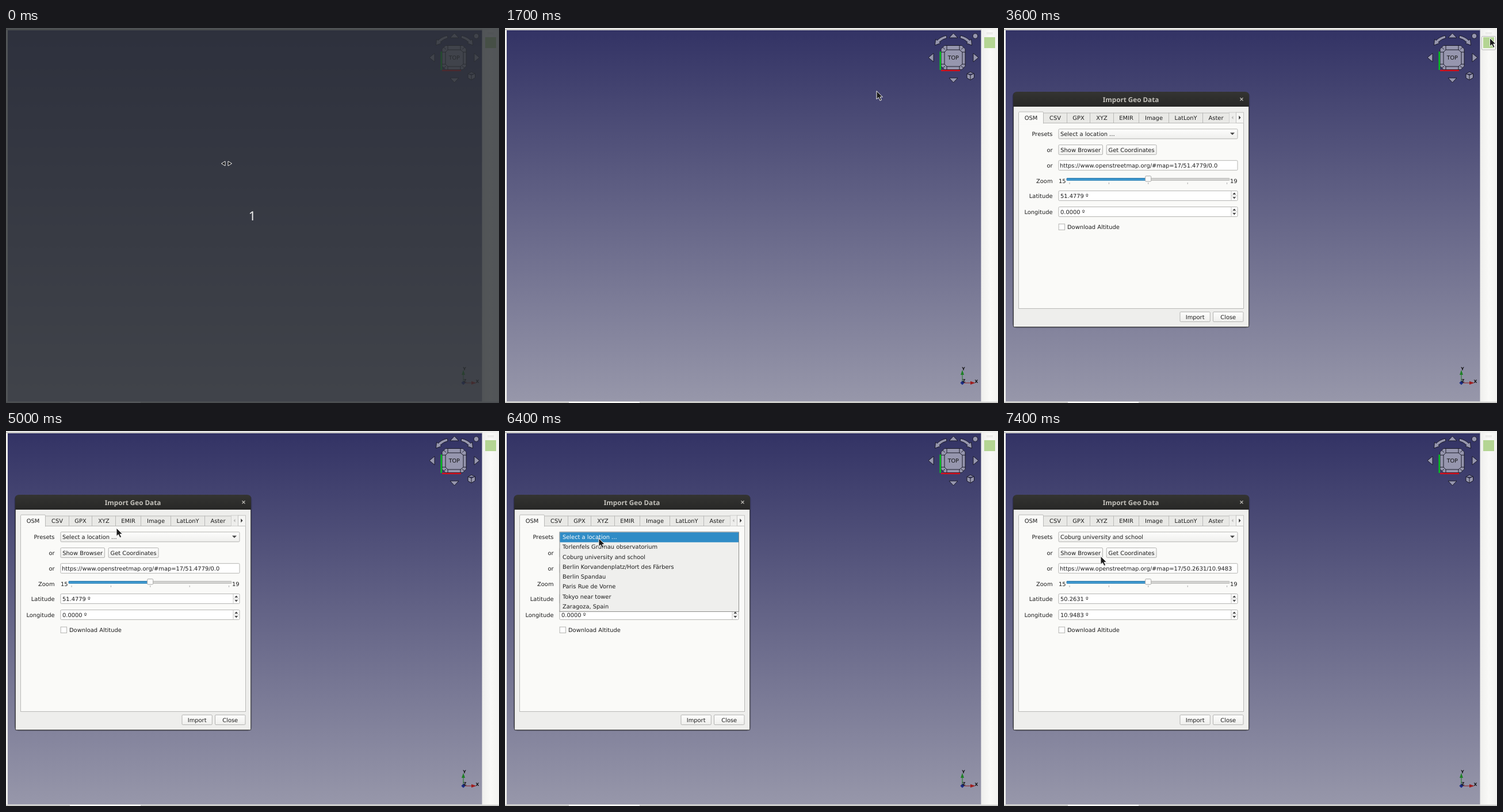
An HTML page for the animation above (8 s loop, 857 by 653 pixels).

```html
<!DOCTYPE html>
<html lang="en">
<head>
<meta charset="utf-8">
<title>Import Geo Data</title>
<style>
html, body { margin: 0; width: 100%; height: 100%; overflow: hidden; background: #efefed; }
svg { display: block; font: 9.9px "DejaVu Sans", sans-serif; text-rendering: geometricPrecision; }
text { white-space: pre; }
</style>
</head>
<body>
<svg id="stage" width="857" height="653" viewBox="0 0 857 653"></svg>
<script>
const stage = document.getElementById("stage");
const $ = id => document.getElementById(id);

// Markup helpers
const rect = (x, y, w, h, fill, stroke = "none", extra = "") =>
  `<rect x="${x}" y="${y}" width="${w}" height="${h}" fill="${fill}" stroke="${stroke}" ${extra}/>`;
const path = (d, extra = "") => `<path d="${d}" ${extra}/>`;
const text = (x, y, s, extra = "") => `<text x="${x}" y="${y}" ${extra}>${s}</text>`;
const centered = (x, y, s, extra = "") => text(x, y, s, `text-anchor="middle" ${extra}`);
const group = (id, body, extra = "") => `<g id="${id}" ${extra}>${body}</g>`;
const gradient = (id, stops, dir = 'x2="0" y2="1"') =>
  `<linearGradient id="${id}" ${dir}>${stops.map((c, i) =>
    `<stop offset="${i / (stops.length - 1)}" stop-color="${c}"/>`).join("")}</linearGradient>`;

const defs = `<defs>
  ${gradient("sky", ["#333365", "#9797aa"])}
  ${gradient("bar", ["#efefed", "#f9f9f7", "#f2f2f0"], 'x2="1" y2="0"')}
  ${gradient("titleFill", ["#343432", "#272726"])}
  ${gradient("buttonFill", ["#fdfdfc", "#efefed"])}
  ${gradient("slideFill", ["#2f86bd", "#4aa5dc"])}
</defs>`;

function windowFrame() {
  return rect(0, 0, 857, 653, "#efefed") +
    rect(0, 2, 828, 1.5, "#b9b9b7") +
    rect(828, 3, 29, 650, "url(#bar)") +
    rect(3, 4, 824.5, 646.5, "url(#sky)") +
    rect(0, 650.5, 857, 2.5, "#e4e4e2") +
    rect(0, 651.5, 857, 1, "#b4b4b2") +
    rect(0, 651, 110, 2, "#cbcbc9") +
    rect(111, 651, 123, 2, "#fafaf8") +
    rect(837, 8, 11, 1, "#dededc") + rect(837, 10, 11, 1, "#e6e6e4");
}

function navigationCube() {
  const turn = path("M767 13Q756 16 751.5 21.5L748.5 19.5L747.5 30L757 26.5L755 24.5Q760 19.5 768 17.5Z");
  return group("nav",
    path("M779.5 9l7.5 8h-15zM736 51.5l9-7.5v15zM823 51.5l-9-7.5v15zM779.5 95l7.5-8h-15z") +
    turn + `<g transform="matrix(-1 0 0 1 1559 0)">${turn}</g>` +
    `<circle cx="817.5" cy="14" r="4.4"/>` +
    path("M809 76.5l6.5 2.8v7.2l-6.5 4l-6-3.5v-7.3zM803 79.7l6 2.3l6.5-2.7M809 82v8.5") +
    path("M764 30.5h30l6 6v30l-6 6h-30l-6-6v-30z") +
    path("M768 38h22l5 4v21l-5 4h-22l-4-4v-21z") +
    path("M768 30.5v7.5M790 30.5v7.5M768 67v5.5M790 67v5.5M758 42h6M758 63h6M795 42h5M795 63h5" +
      "M761 33.5l4 4M797 33.5l-4 4M761 69.5l4-3M797 69.5l-4-3", 'fill="none"'),
    'fill="#9696ae" stroke="#191927" stroke-width="1"') +
    rect(755.5, 41, 2.4, 32, "#00c81e") + rect(758, 72.8, 33, 2.4, "#d8101c") +
    centered(779.3, 55, "TOP", 'fill="#111" font-size="9.6"');
}

function axisCross() {
  return path("M795 618V603", 'stroke="#1f7a26"') +
    path("M795 595.5l-3 8.5h6z", 'fill="#1f8027"') +
    path("M795 618H810", 'stroke="#8e2020"') +
    path("M817.5 618l-8.5-3v6z", 'fill="#a01c1c"') +
    path("M795 614.2l3.6 3.8l-3.6 3.6l-3.6-3.6z", 'fill="#1c2d85"') +
    `<g font-size="7.5" font-weight="bold" fill="#111">` +
    centered(797, 595.5, "Y") + centered(819.5, 617.5, "X") + centered(797.8, 617.3, "Z") + "</g>";
}

const toolButton = rect(830.5, 14.5, 24, 23.5, "#f8f8f6", "#b5b5b3", 'id="hover" rx="2"') +
  rect(833, 16, 19, 19, "#b4d593");

const button = (x, y, w, label) =>
  rect(x, y, w, 17, "url(#buttonFill)", "#b3b3b1", 'rx="1.5"') + centered(x + w / 2, y + 12.1, label);
const field = y => rect(95, y, 311, 17, "#fff", "#b3b3b1", 'rx="1.5"');
const label = (y, s) => text(84.5, y, s, 'text-anchor="end"');
const spinBox = (y, id) => field(y) + path(`M395 ${y}v17M395 ${y + 8.5}h11`, 'stroke="#c6c6c4"') +
  path(`M400.3 ${y + 3}l3 3.4h-6zM400.3 ${y + 14}l3-3.4h-6z`, 'fill="#444"') +
  text(98, y + 12.1, "", `id="${id}"`);

function tabs() {
  const names = ["OSM", "CSV", "GPX", "XYZ", "EMIR", "Image", "LatLonY", "Aster"];
  const edges = [25.5, 68.5, 109.5, 149.5, 190.5, 234.5, 286.5, 345.5, 391.5];
  return names.map((name, i) => {
    const x = edges[i], w = edges[i + 1] - x, active = i === 0;
    return (active ? rect(x, 146, w, 21, "#fafaf8", "#b9b9b7", 'rx="1.5"') + rect(x + .5, 164.5, w - 1, 4, "#fafaf8")
      : rect(x, 148, w, 17.5, "#e9e9e6", "#b9b9b7")) +
      centered(x + w / 2, active ? 159.6 : 160.4, name);
  }).join("");
}

function slider() {
  const ticks = [0, 1, 2, 3, 4].map(i => `M${114 + 68.4 * i} 269v3`).join("");
  return text(95, 269.6, "15") + text(393, 269.6, "19") +
    rect(109, 261.5, 283, 4, "#d2d2d0", "#b5b5b3", 'stroke-width=".8" rx="1"') +
    rect(109, 261.5, 141, 4, "url(#slideFill)", "#2c7db0", 'stroke-width=".8" rx="1"') +
    path(ticks, 'stroke="#aaa"') +
    rect(245.7, 257.7, 10, 9.5, "#fbfbfa", "#a9a9a7", 'rx="1.5"');
}

const places = ["Select a location ...", "Torlenfels Grumau observatorium", "Coburg university and school",
  "Berlin Korvandenplatz/Hort des Färbers", "Berlin Spandau", "Paris Rue de Vorne",
  "Tokyo near tower", "Zaragoza, Spain"];
const rowHeight = 17.25;

function popup() {
  return group("popup", rect(95, 176, 311.5, 138.5, "#efefed", "#8d8d8b") +
    rect(95.5, 176.5, 310.5, rowHeight, "#308cc6", "none", 'id="mark"') +
    places.map((place, i) => text(100, 188.2 + i * rowHeight, place, 'class="place"')).join(""));
}

function dialog() {
  return group("dialog",
    rect(14.5, 112, 413, 410.5, "#000", "none", 'rx="7" opacity=".18"') +
    rect(15.5, 111.5, 410.5, 410, "#000", "none", 'rx="6" opacity=".3"') +
    rect(16.5, 130, 409, 390.5, "#eeeeec", "#4a4a4a") +
    path("M16 137V118q0-7 7-7H419q7 0 7 7V137z", 'fill="url(#titleFill)"') +
    centered(220.5, 128.8, "Import Geo Data",
      'fill="#c3c1bb" font-size="11.7" font-weight="bold" font-family="Noto Sans, sans-serif"') +
    path("M410.5 121.5l5 5m0-5l-5 5", 'stroke="#c3c1bb" stroke-width="1.1"') +
    rect(25.5, 165.5, 391, 323, "#fafaf8", "#b9b9b7") + tabs() +
    rect(391.5, 147, 12, 18.5, "#eeeeec", "#cfcfcd") + rect(403.5, 147, 13, 18.5, "#f6f6f4", "#c3c3c1") +
    path("M395.5 156l3-3v6z", 'fill="#bdbdbb"') + path("M411.5 156l-3.2-3.4v6.8z", 'fill="#333"') +
    label(187.6, "Presets") + label(215.6, "or") + label(242.6, "or") +
    label(269.6, "Zoom") + label(295.6, "Latitude") + label(323.6, "Longitude") +
    rect(95, 175.9, 311, 17, "url(#buttonFill)", "#b3b3b1", 'rx="1.5"') +
    path("M393 182.3h8l-4 4z", 'fill="#444"') + text(98, 187.6, "", 'id="preset"') +
    button(95, 203.5, 76.5, "Show Browser") + button(178.2, 203.5, 86.8, "Get Coordinates") +
    field(230.7) + text(97, 242.6, "", 'id="address"') +
    slider() + spinBox(283.6, "latitude") + spinBox(311.5, "longitude") +
    rect(95.2, 341.2, 10.4, 10.4, "#fff", "#b3b3b1") + text(110, 350, "Download Altitude") +
    button(306, 494.4, 52.3, "Import") + button(363.5, 494.4, 52.5, "Close") + popup(),
    'fill="#1c1c1c"');
}

stage.innerHTML = defs + windowFrame() + navigationCube() + axisCross() + toolButton + dialog() +
  path("M0 0V14.3L3.4 11.3L6 16.8L8.6 15.6L6.1 10.4H10.5Z",
    'id="cursor" fill="#1d1d1d" stroke="#f4f4f4" stroke-width="1" stroke-linejoin="round"') +
  group("countdown", rect(0, 0, 857, 653, "#2d3034", "none", 'opacity=".81"') +
    path("M374.5 236l6.5-4v8zM392.5 236l-6.5-4v8z", 'fill="#111" stroke="#f2f2f2"') +
    centered(428, 335, "1", 'fill="#f0f0f0" font-size="22" font-family="Noto Sans, sans-serif"'));

// Pointer keys: time, x, y, easing used to arrive there
const linear = p => p;
const smooth = p => p * p * (3 - 2 * p);
const soft = p => (smooth(p) + p) / 2;
const keys = [
  [0, 383, 235], [1200, 383, 235], [2100, 834, 20, smooth], [2200, 846, 34], [2300, 848, 19],
  [2400, 848, 19], [2700, 844.5, 17.5], [3900, 844.5, 17.5], [4800, 279, 167, soft],
  [4900, 230, 167.5], [5000, 192, 169], [5100, 176, 178], [5200, 168, 185], [5300, 166, 188],
  [5400, 166, 188], [5500, 161, 185], [5600, 163, 186], [6300, 163, 186], [6400, 163, 187],
  [6500, 164, 195], [6600, 166, 207], [6700, 168, 218], [8000, 168, 218]
];

function pointerAt(t) {
  const i = keys.findIndex(key => key[0] > t);
  const [t0, x0, y0] = keys[i - 1], [t1, x1, y1, ease = linear] = keys[i];
  const p = ease((t - t0) / (t1 - t0));
  return [x0 + (x1 - x0) * p, y0 + (y1 - y0) * p];
}

const show = (id, on) => $(id).setAttribute("display", on ? "inline" : "none");
const write = (id, s) => { $(id).textContent = s; };
const placeLabels = [...document.querySelectorAll(".place")];

function render(time) {
  const t = Math.floor(time / 100) * 100;
  const [x, y] = pointerAt(t);
  $("cursor").setAttribute("transform", `translate(${x} ${y})`);
  show("cursor", t >= 100);
  show("countdown", t < 100);
  show("hover", t >= 2100 && t < 4000);
  $("hover").setAttribute("fill", t === 3000 ? "#dcdcda" : "#f8f8f6");
  show("dialog", t >= 3600);
  show("popup", t >= 5800 && t < 7400);

  const row = t < 6500 ? 0 : Math.max(0, Math.floor((y - 176) / rowHeight));
  $("mark").setAttribute("y", 176.5 + row * rowHeight);
  placeLabels.forEach((el, i) => el.setAttribute("fill", i === row ? "#fff" : "#1c1c1c"));

  const chosen = t >= 7400;
  const [lat, lon] = chosen ? ["50.2631", "10.9483"] : ["51.4779", "0.0000"];
  write("preset", places[chosen ? 2 : 0]);
  write("address", `https://www.openstreetmap.org/#map=17/${lat}/${chosen ? lon : "0.0"}`);
  write("latitude", lat + " º");
  write("longitude", lon + " º");
}

const start = performance.now();
function tick() {
  render((performance.now() - start) % 8000);
  requestAnimationFrame(tick);
}
tick();
</script>
</body>
</html>
```
